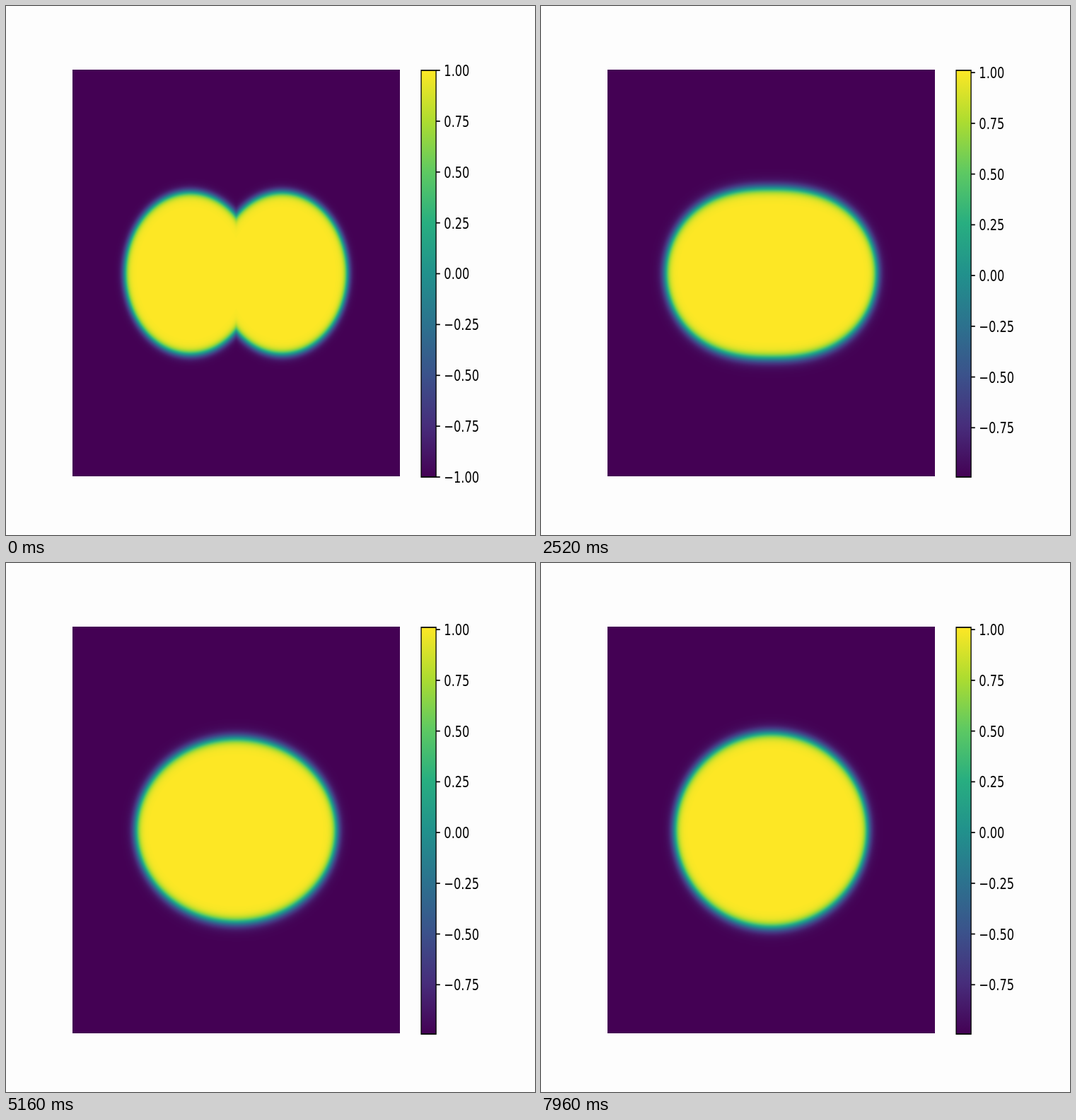
These frames come from a looping animation (748x748 px, 8 s). An HTML page with a canvas:

```html
<!DOCTYPE html>
<html lang="en">
<head>
<meta charset="utf-8">
<title>Phase separation</title>
<style>
html, body { margin: 0; width: 100%; height: 100%; overflow: hidden; background: #fdfdfd; }
canvas { display: block; }
</style>
</head>
<body>
<canvas id="stage" width="748" height="748"></canvas>
<script>
const ctx = document.getElementById('stage').getContext('2d');
const LOOP = 8000, STEP = 40;
// The figure is laid out at 640 x 480 and shown square.
const SX = 748 / 640, SY = 748 / 480;
const PLOT = { x: 80, y: 58, w: 397, h: 369 };
const BAR = { x: 502.3, y: 58.4, w: 18, h: 369 };

const stops = ['440154', '472d7b', '3b528b', '2c728e', '21918c', '28ae80', '5ec962', 'addc30', 'fde725'];
const rgb = stops.map(s => [0, 2, 4].map(i => parseInt(s.slice(i, i + 2), 16)));
const palette = Array.from({ length: 256 }, (_, i) => {
  const u = i / 255 * 8, k = Math.min(7, Math.floor(u));
  return rgb[k].map((c, j) => Math.round(c + (rgb[k + 1][j] - c) * (u - k)));
});

const field = document.createElement('canvas');
field.width = Math.round(PLOT.w * SX);
field.height = Math.round(PLOT.h * SY);
const fieldCtx = field.getContext('2d');
const image = fieldCtx.createImageData(field.width, field.height);

function put(col, row, color) {
  const i = (row * field.width + col) * 4;
  image.data[i] = color[0];
  image.data[i + 1] = color[1];
  image.data[i + 2] = color[2];
  image.data[i + 3] = 255;
}

// Two discs, joined by a smooth minimum of reach k; positive outside.
function pairDistance(x, y, k) {
  const near = Math.hypot(x - 0.14, y) - 0.2;
  const far = Math.hypot(x + 0.14, y) - 0.2;
  const blend = Math.max(0, k - far + near);
  return near - blend * blend / (4 * k);
}

// The field is symmetric, so one quadrant is computed and mirrored.
function drawField(t) {
  const merge = 1 - Math.exp(-t / 350);
  const skew = 0.158 * Math.exp(-t / 7500);
  const mean = 0.2662 + 0.0012 * t / LOOP;
  const a = mean + skew / 2, b = mean - skew / 2;
  const p = 2 + 2.1 * Math.exp(-Math.pow(t / 2000, 1.6));
  const width = 0.0115 + 0.0025 * merge;
  const k = 0.004 + 0.12 * merge;
  const { width: w, height: h } = field;

  for (let col = 0; col < w / 2; col++) {
    const x = 0.5 - (col + 0.5) / w;
    const up = Math.pow(x / a, p);
    const gx = p * up / Math.max(x, 1e-6);
    for (let row = 0; row < h / 2; row++) {
      const y = 0.5 - (row + 0.5) / h;
      const uq = (y / b) ** 2;
      const blob = (up + uq - 1) / (Math.hypot(gx, 2 * y / (b * b)) + 1e-6);
      let d = blob;
      if (merge < 0.999) {
        const pair = pairDistance(x, y, k);
        d = pair + (Math.max(-0.3, blob) - pair) * merge;
      }
      const value = Math.tanh(-d / width);
      const color = palette[Math.round((value + 1) * 127.5)];
      put(col, row, color);
      put(w - 1 - col, row, color);
      put(col, h - 1 - row, color);
      put(w - 1 - col, h - 1 - row, color);
    }
  }
  fieldCtx.putImageData(image, 0, 0);
  ctx.drawImage(field, PLOT.x, PLOT.y, PLOT.w, PLOT.h);
}

function drawBar(t) {
  const top = t ? 1.011 : 1, low = t ? -0.993 : -1;
  const fill = ctx.createLinearGradient(0, BAR.y + BAR.h, 0, BAR.y);
  stops.forEach((s, i) => fill.addColorStop(i / 8, '#' + s));
  ctx.fillStyle = fill;
  ctx.fillRect(BAR.x, BAR.y, BAR.w, BAR.h);
  ctx.lineWidth = 1.11;
  ctx.strokeStyle = ctx.fillStyle = '#000';
  ctx.strokeRect(BAR.x, BAR.y, BAR.w, BAR.h);
  ctx.font = '13.89px "DejaVu Sans", sans-serif';
  const right = BAR.x + BAR.w;
  for (let v = -1; v <= 1; v += 0.25) {
    if (v < low) continue;
    const y = BAR.y + (top - v) / (top - low) * BAR.h;
    ctx.beginPath();
    ctx.moveTo(right, y);
    ctx.lineTo(right + 4.86, y);
    ctx.stroke();
    ctx.fillText(v.toFixed(2).replace('-', '\u2212'), right + 9.6, y + 5.1);
  }
}

const start = performance.now();
let shown = -1;

function frame() {
  const t = Math.floor((performance.now() - start) % LOOP / STEP) * STEP;
  if (t !== shown) {
    shown = t;
    ctx.fillStyle = '#fdfdfd';
    ctx.fillRect(0, 0, 748, 748);
    ctx.save();
    ctx.scale(SX, SY);
    drawField(t);
    drawBar(t);
    ctx.restore();
  }
  requestAnimationFrame(frame);
}
frame();
</script>
</body>
</html>
```
